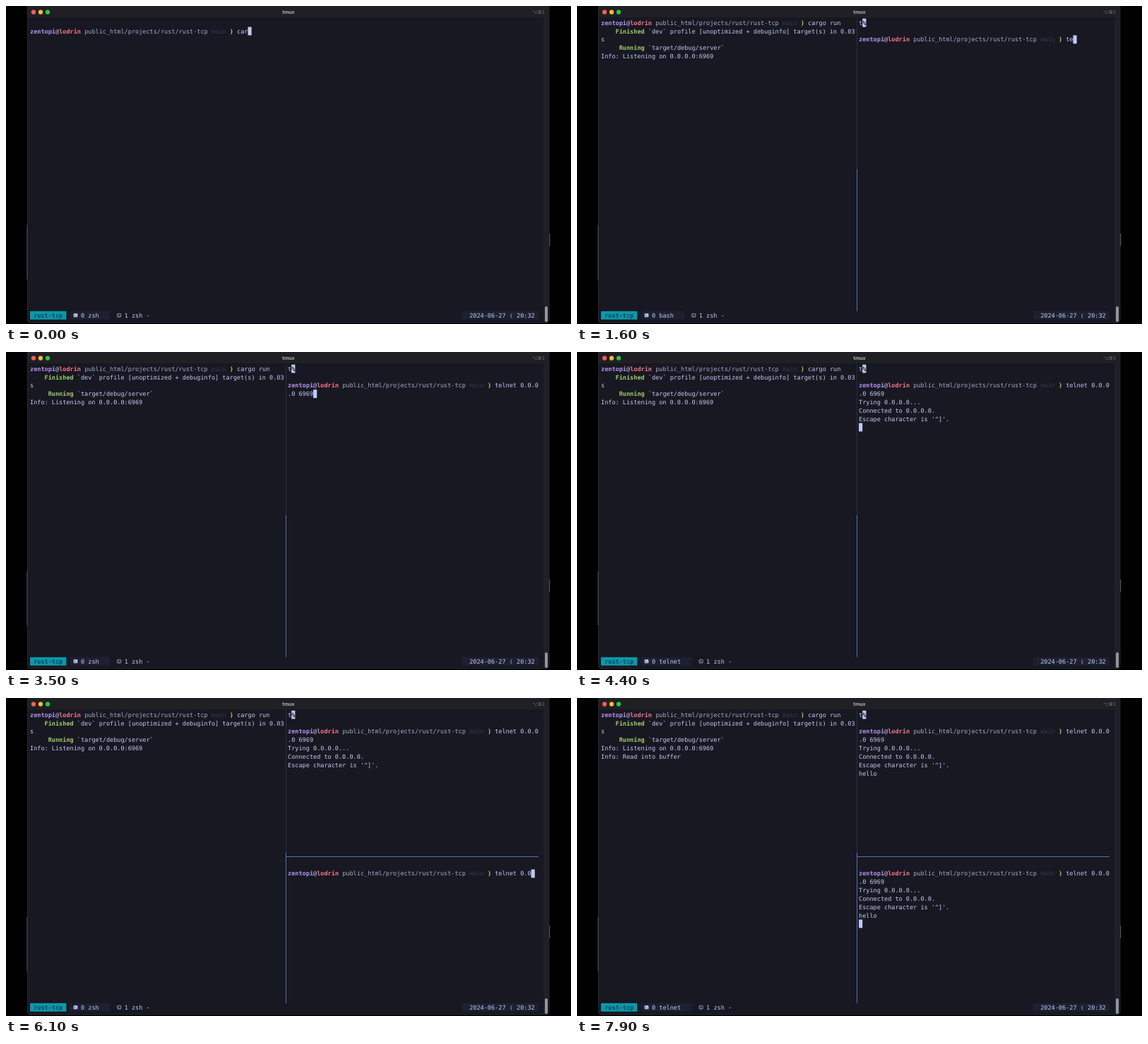
Write an HTML page that moves like this. It is 800x450 px and loops after 8 s.

```html
<!DOCTYPE html>
<html lang="en">
<head>
<meta charset="utf-8">
<title>Terminal session</title>
<style>
html, body { margin: 0; width: 100%; height: 100%; overflow: hidden; background: #000; }
svg { display: block; width: 800px; height: 450px; }
text { white-space: pre; text-rendering: geometricPrecision; font: 8.54px "DejaVu Sans Mono", monospace; }
.b { font-weight: bold; }
.title { font: bold 7px Inter, sans-serif; }
.keys { font: 6.4px "DejaVu Sans", sans-serif; }
</style>
</head>
<body>
<svg viewBox="0 0 800 450">
  <path d="M30.3 310V387" stroke="#77798a" stroke-width="1.4"/>
  <path d="M769.5 322V340" stroke="#66676c" stroke-width="1.4"/>
  <rect x="30.5" y="-4" width="738.5" height="452" rx="4" fill="#181822" stroke="#303138" stroke-width=".8"/>
  <rect x="31" y="0" width="737.5" height="16" fill="#202024"/>
  <rect x="761" y="16" width="7.5" height="431" fill="#1e1f27"/>
  <rect x="763" y="425" width="4" height="22" rx="2" fill="#94959b"/>
  <circle cx="39" cy="8.7" r="3.1" fill="#fe5f57"/>
  <circle cx="49" cy="8.7" r="3.1" fill="#febc2e"/>
  <circle cx="59" cy="8.7" r="3.1" fill="#28c840"/>
  <text class="title" x="400" y="11" text-anchor="middle" fill="#b4b4b6">tmux</text>
  <text class="keys" x="763" y="10.5" text-anchor="end" fill="#77777b">⌥⌘1</text>
  <g id="screen"></g>
</svg>
<script>
const screen = document.getElementById('screen');
const LEFT = 34, TOP = 17.8, CW = 5.142, CH = 11.83, SPLIT = 71;
const FG = '#c0caf5', BG = '#181822', BLUE = '#5072b4', DIM = '#2b2d3e', GREEN = '#9ece6a';
const COMMAND = 'telnet 0.0.0.0 6969';
const cx = col => LEFT + col * CW;
const cy = row => TOP + row * CH;

const text = (col, row, s, fill = FG, bold = false) =>
  `<text x="${cx(col)}" y="${cy(row) + 8.9}" fill="${fill}"${bold ? ' class="b"' : ''}>${s}</text>`;
const block = (col, row, cols, fill) =>
  `<rect x="${cx(col)}" y="${cy(row)}" width="${cols * CW}" height="${CH}" fill="${fill}"/>`;
const cursor = (col, row) => block(col, row, 1, FG);
const line = (x1, y1, x2, y2, color) =>
  `<path d="M${x1} ${y1}L${x2} ${y2}" stroke="${color}"/>`;
const lines = (col, row, list) => list.map((s, i) => text(col, row + i, s)).join('');
const typed = (s, t, start, each) => s.slice(0, Math.max(0, Math.floor((t - start) / each)));

const prompt = (col, row) =>
  text(col, row, 'zentopi', '#b294f0', true) + text(col + 7, row, '@', FG) +
  text(col + 8, row, 'lodrin', '#f7768e', true) +
  text(col + 15, row, 'public_html/projects/rust/rust-tcp', '#a3abd0') +
  text(col + 50, row, 'main', '#343950') + text(col + 55, row, ')', '#d8c56c', true);

function icon(col, filled) {
  const x = cx(col), y = cy(35) + 3.6;
  return `<rect x="${x + .3}" y="${y}" width="5" height="4.6" rx=".6" stroke="${FG}" stroke-width=".7" fill="${filled ? FG : 'none'}"/>` +
    `<path d="M${x + 1.2} ${y + 1.2}l1.1 1.1l-1.1 1.1M${x + 2.8} ${y + 3.5}h1.5" fill="none" stroke="${filled ? BG : FG}" stroke-width=".6"/>`;
}

function status(name) {
  const end = 19 + name.length;
  return block(0, 35, 10, '#0a98aa') + text(1, 35, 'rust-tcp', '#16405a', true) +
    block(11, 35, end - 11, '#1d2030') + icon(12, true) + text(14, 35, '0 ' + name) +
    icon(end + 2, false) + text(end + 4, 35, '1 zsh -') +
    block(119, 35, 21, '#1d2030') + text(121, 35, '2024-06-27') +
    text(132, 35, '❬', '#a3abd0') + text(134, 35, '20:32');
}

function build(row, wide) {
  const next = row + (wide ? 1 : 2);
  return text(4, row, 'Finished', GREEN, true) +
    text(13, row, '`dev` profile [unoptimized + debuginfo] target(s) in 0.03' + (wide ? 's' : '')) +
    (wide ? '' : text(0, row + 1, 's')) +
    text(5, next, 'Running', GREEN, true) + text(13, next, '`target/debug/server`') +
    text(0, next + 1, 'Info: Listening on 0.0.0.0:6969');
}

function server(t) {
  if (t < 1200) {
    const cmd = typed('cargo run', t, -300, 100);
    const out = prompt(0, 1) + text(57, 1, cmd);
    if (t < 700) return out + cursor(57 + cmd.length, 1);
    if (t < 800) return out + cursor(0, 2);
    return out + build(2, true) + cursor(0, 5);
  }
  return prompt(0, 0) + text(57, 0, 'cargo run') + build(1, false) +
    (t >= 7800 ? text(0, 5, 'Info: Read into buffer') : '');
}

// A prompt with the telnet command wrapped after twelve characters
function client(row, cmd, connected) {
  const n = cmd.length;
  const out = prompt(SPLIT, row) + text(SPLIT + 57, row, cmd.slice(0, 12)) + text(SPLIT, row + 1, cmd.slice(12));
  if (connected)
    return out + lines(SPLIT, row + 2, ['Trying 0.0.0.0...', 'Connected to 0.0.0.0.', "Escape character is '^]'."]);
  return out + (n < 12 ? cursor(SPLIT + 57 + n, row) : cursor(SPLIT + n - 12, row + 1));
}

function upper(t) {
  if (t < 1300) return cursor(SPLIT, 0);
  if (t < 1400) return text(SPLIT, 0, 't') + cursor(SPLIT + 1, 0);
  return text(SPLIT, 0, 't') + block(SPLIT + 1, 0, 1, FG) + text(SPLIT + 1, 0, '%', BG, true) +
    client(2, typed(COMMAND, t, 1384, 108), t >= 3600) +
    (t >= 3600 && t < 4700 ? cursor(SPLIT, 7) : '') +
    (t >= 7800 ? text(SPLIT, 7, 'hello') : '');
}

function lower(t) {
  if (t < 4800) return cursor(SPLIT, 18);
  const out = client(19, typed(COMMAND, t, 4849, 117), t >= 7200);
  if (t < 7200) return out;
  const word = typed('hello', t, 7210, 90);
  return out + text(SPLIT, 24, word) + (t < 7800 ? cursor(SPLIT + word.length, 24) : cursor(SPLIT, 25));
}

function borders(t) {
  const x = 396.5, split = t >= 4700, mid = cy(split ? 17 : 18);
  return line(x, cy(0), x, mid, DIM) + line(x, mid, x, cy(35), BLUE) +
    (split ? line(x, 224.5, cx(140), 224.5, BLUE) : '');
}

function windowName(t) {
  if (t >= 1300 && t < 1800) return 'bash';
  return (t >= 4000 && t < 5000) || t >= 7600 ? 'telnet' : 'zsh';
}

let last = -1;
function frame(now) {
  const t = Math.floor(now % 8000 / 100) * 100;
  if (t !== last) {
    last = t;
    screen.innerHTML = status(windowName(t)) + server(t) +
      (t >= 1200 ? borders(t) + upper(t) : '') + (t >= 4700 ? lower(t) : '');
  }
  requestAnimationFrame(frame);
}
frame(0);
</script>
</body>
</html>
```
